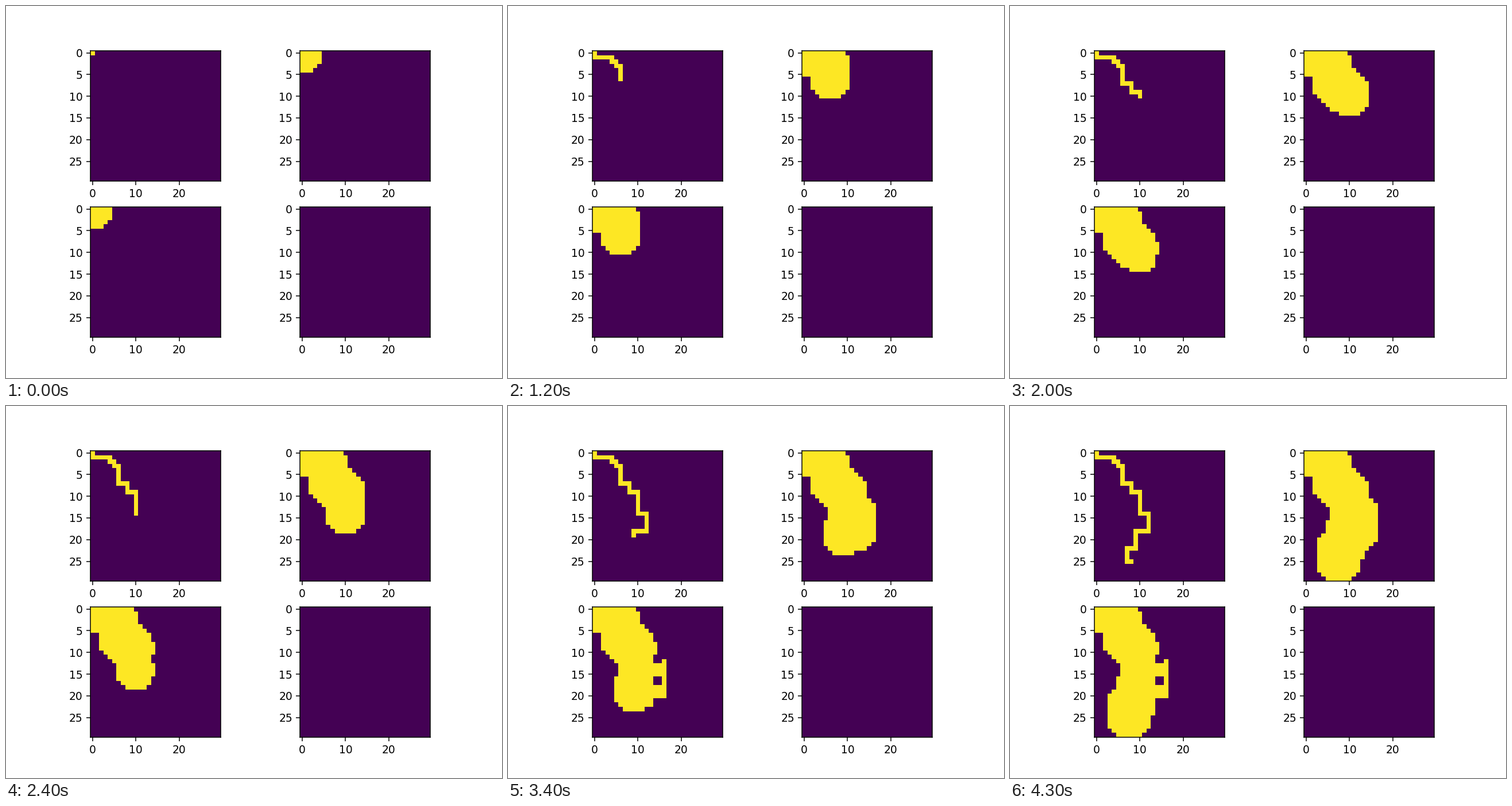
These frames come from a looping animation (864x648 px, 4.4 s). A matplotlib script:

```python
import numpy as np
import matplotlib.pyplot as plt
from matplotlib.animation import FuncAnimation

SIZE = 30
SIGHT = 5
STEPS = {"D": (1, 0), "R": (0, 1), "L": (0, -1)}
# runs of moves: direction and length
ROUTE = "D1 R4 D1 R1 D1 R1 D4 R2 D2 R2 D5 R2 D4 L3 D4 L2 D3 R1"

rows, cols = np.mgrid[:SIZE, :SIZE]
# two-by-two blocks, one every five rows
walls = ((cols == 14) | (cols == 15)) & ((rows % 5 == 1) | (rows % 5 == 2))


def walk(route):
    r = c = 0
    cells = [(r, c)]
    for run in route.split():
        dr, dc = STEPS[run[0]]
        for _ in range(int(run[1:])):
            r, c = r + dr, c + dc
            cells.append((r, c))
    return cells


path = walk(ROUTE)


def grids(n):
    trail = np.zeros((SIZE, SIZE), bool)
    seen = np.zeros((SIZE, SIZE), bool)
    for r, c in path[:n + 1]:
        trail[r, c] = True
        seen |= (rows - r) ** 2 + (cols - c) ** 2 < SIGHT ** 2
    return trail, seen, seen & ~walls, np.zeros((SIZE, SIZE), bool)


fig, axes = plt.subplots(2, 2, figsize=(6.4, 4.8), dpi=135)
images = [ax.imshow(g.astype(float), cmap="viridis", vmin=0, vmax=1)
          for ax, g in zip(axes.flat, grids(0))]


def update(n):
    for im, g in zip(images, grids(n)):
        im.set_data(g.astype(float))
    return images


anim = FuncAnimation(fig, update, frames=len(path), interval=100,
                     init_func=lambda: update(0), repeat=True, repeat_delay=0)
plt.show()
```
